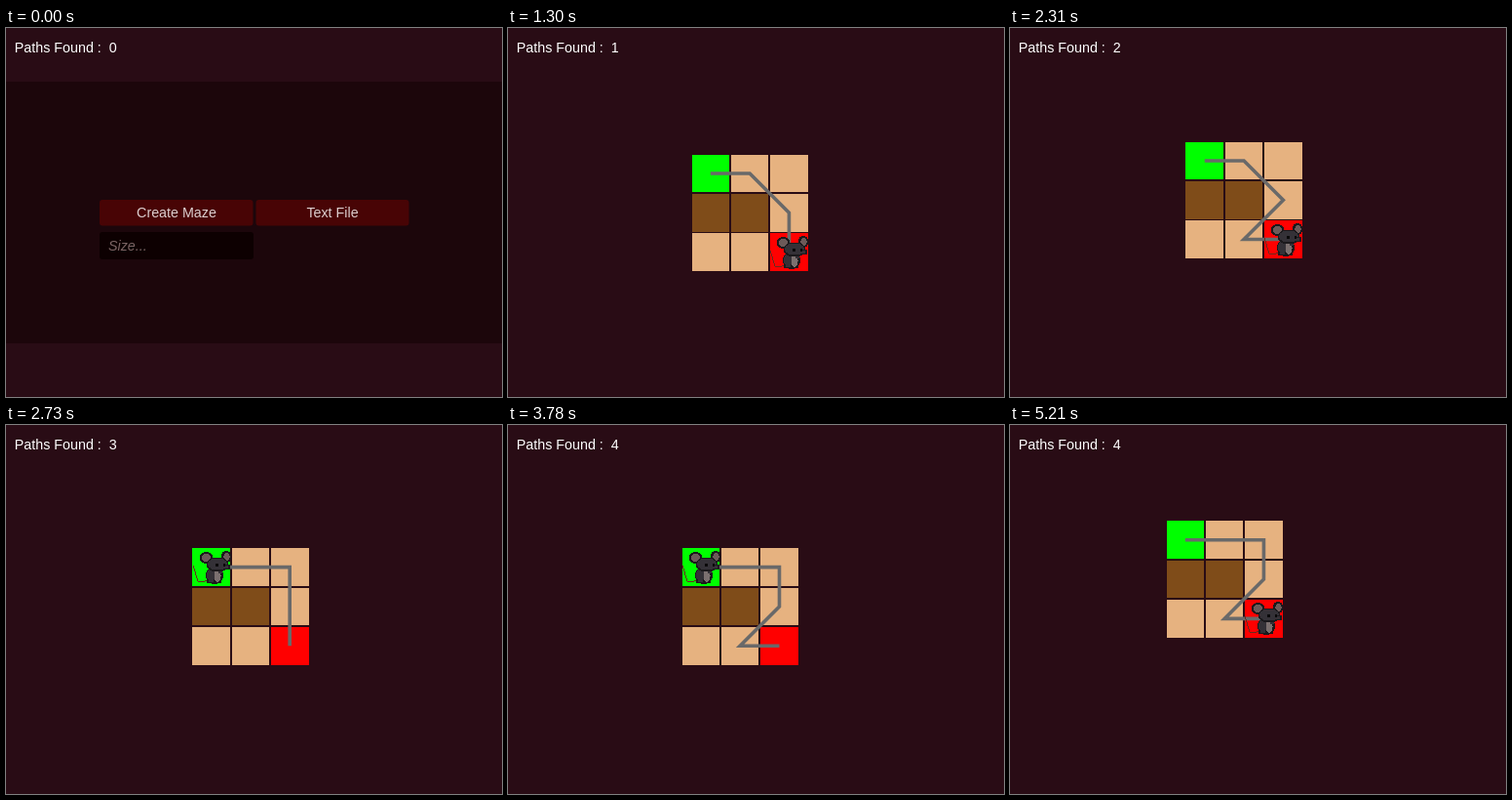
Recreate the animation shown at these times as an HTML page with a canvas. Size 509 px wide and 378 px high, loop 5.24 s.

```html
<!DOCTYPE html>
<html lang="en">
<head>
<meta charset="utf-8">
<title>Maze paths</title>
<style>
  html, body { margin: 0; width: 100%; height: 100%; overflow: hidden; background: #290c15; }
  canvas, svg { position: absolute; left: 0; top: 0; width: 509px; height: 378px; }
  text { font: 14.3px "Liberation Sans", Arial, sans-serif; white-space: pre; }
  .label { fill: #dccfcf; text-anchor: middle; }
  .hint { fill: #7b6464; font-style: italic; }
</style>
</head>
<body>
<canvas width="509" height="378"></canvas>
<svg viewBox="0 0 509 378">
  <g id="menu">
    <rect y="55" width="509" height="268" fill="#1c060b"/>
    <rect x="96" y="176" width="157.5" height="26.5" rx="3" fill="#480405"/>
    <rect x="256.5" y="176" width="157" height="26.5" rx="3" fill="#480405"/>
    <rect x="96" y="209" width="158" height="28" rx="3" fill="#0d0001"/>
    <text class="label" x="175" y="194">Create Maze</text>
    <text class="label" x="335" y="194">Text File</text>
    <text class="hint" x="105" y="228">Size...</text>
  </g>
  <text id="count" x="8.8" y="25" fill="#fff">Paths Found :  0</text>
</svg>
<script>
const LOOP = 5240, MENU_END = 230, STEP = 190, FOLLOW = 0.00215;
const CELL = 38.6, PITCH = 40.3;
const HOME = { x: 234.6, y: 168.8 };   // maze corner when the first cell is centred
const TAN = '#e6b280', BROWN = '#7f4c19';
const COLORS = [['#00ff00', TAN, TAN], [BROWN, BROWN, TAN], [TAN, TAN, '#ff0000']];
const PATHS = [
  { start: 545, nodes: [[0, 0], [1, 0], [2, 1], [2, 2]] },
  { start: 1460, nodes: [[0, 0], [1, 0], [2, 1], [1, 2], [2, 2]] },
  { start: 2545, nodes: [[0, 0], [1, 0], [2, 0], [2, 1], [2, 2]] },
  { start: 3660, nodes: [[0, 0], [1, 0], [2, 0], [2, 1], [1, 2], [2, 2]] }
];
const STOPS = [{ time: MENU_END, node: [0, 0] }];
for (const { start, nodes } of PATHS)
  nodes.forEach((node, i) => STOPS.push({ time: start + i * STEP, node }));

const ctx = document.querySelector('canvas').getContext('2d');
const menu = document.getElementById('menu');
const count = document.getElementById('count');

// The view eases exponentially toward the cell the mouse stands on.
function sceneAt(t) {
  let x = 281, y = 134, node = STOPS[0].node;
  STOPS.forEach((stop, i) => {
    if (stop.time > t) return;
    node = stop.node;
    const end = i + 1 < STOPS.length ? Math.min(t, STOPS[i + 1].time) : t;
    const left = Math.exp(-FOLLOW * (end - stop.time));
    const tx = HOME.x - node[0] * PITCH, ty = HOME.y - node[1] * PITCH;
    x = tx + (x - tx) * left;
    y = ty + (y - ty) * left;
  });
  return { x, y, node };
}

function drawCells(x, y) {
  COLORS.forEach((row, r) => row.forEach((color, c) => {
    const x0 = Math.round(x + c * PITCH), y0 = Math.round(y + r * PITCH);
    ctx.fillStyle = color;
    ctx.fillRect(x0, y0, Math.round(x + c * PITCH + CELL) - x0,
                 Math.round(y + r * PITCH + CELL) - y0);
  }));
}

const centre = (x, y, [c, r]) => [x + c * PITCH + CELL / 2, y + r * PITCH + CELL / 2];

function drawPath(x, y, nodes) {
  ctx.strokeStyle = '#696969';
  ctx.lineWidth = 3.6;
  ctx.lineJoin = 'miter';
  ctx.miterLimit = 4;
  ctx.beginPath();
  for (const node of nodes) ctx.lineTo(...centre(x, y, node));
  ctx.stroke();
}

// An ellipse built from pixel rows.
function blob(color, cx, cy, rx, ry) {
  ctx.fillStyle = color;
  const top = Math.round(cy - ry), bottom = Math.round(cy + ry);
  for (let y = top; y < bottom; y++) {
    const v = (y + 0.5 - cy) / ry;
    const half = rx * Math.sqrt(Math.max(0, 1 - v * v));
    const left = Math.round(cx - half);
    ctx.fillRect(left, y, Math.round(cx + half) - left, 1);
  }
}

function block(color, x, y, w, h) {
  ctx.fillStyle = color;
  ctx.fillRect(x, y, w, h);
}

function drawMouse(x, y) {
  const edge = '#1b191c', fur = '#343137', ear = '#6c5a59', belly = '#7b706f', tail = '#6a2a1e';
  ctx.save();
  ctx.translate(Math.round(x), Math.round(y));
  block(tail, -19, -2, 1, 3);
  block(tail, -18, 1, 1, 3);
  block(tail, -17, 4, 1, 4);
  block(tail, -16, 8, 1, 3);
  block(tail, -15, 11, 1, 3);
  block(tail, -14, 14, 7, 1);
  block(tail, -7, 13, 2, 1);
  blob(edge, -5.5, -10, 7, 6);
  blob(edge, 15, -11, 5.5, 6);
  blob(ear, -5.5, -10, 4.5, 4);
  blob(ear, 15.5, -11, 3.2, 4);
  blob(edge, 3, 8, 9, 9);
  blob(fur, 2, 8, 7, 7.5);
  block(edge, -5, 12, 15, 4);
  block(fur, -3, 11, 5, 4);
  blob(belly, 6, 8.5, 3.5, 6.5);
  blob(edge, 6, -3, 11.5, 7.5);
  blob(fur, 6, -3.5, 10, 6);
  block(edge, 14, -3, 5, 5);
  block(fur, 12, -2, 5, 3);
  block('#0a090a', 4, -4, 3, 3);
  block('#0a090a', 12, -4, 2, 3);
  block(fur, 7, 4, 4, 2);
  ctx.restore();
}

function draw(t) {
  const found = PATHS.filter(p => p.start <= t).length;
  const inMenu = t < MENU_END;
  menu.style.display = inMenu ? '' : 'none';
  count.textContent = 'Paths Found :  ' + found;
  ctx.clearRect(0, 0, 509, 378);
  if (inMenu) return;
  const { x, y, node } = sceneAt(t);
  drawCells(x, y);
  if (found) drawPath(x, y, PATHS[found - 1].nodes);
  drawMouse(...centre(x, y, node));
}

const begin = performance.now();
function tick() {
  draw((performance.now() - begin) % LOOP);
  requestAnimationFrame(tick);
}
tick();
</script>
</body>
</html>
```
